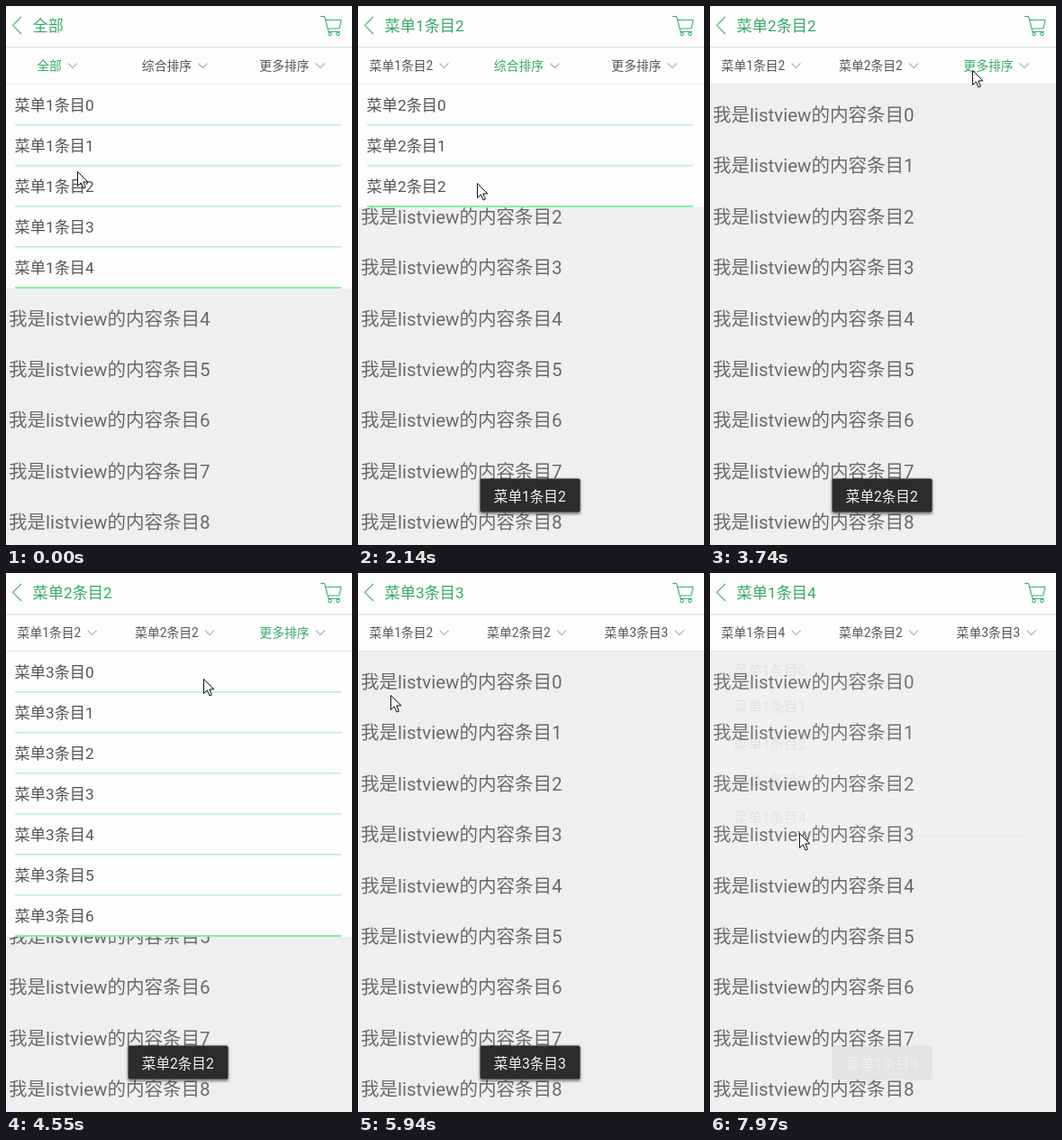
Animation, 384 px wide and 597 px high, one loop 8000 ms. Source, as an HTML page:

```html
<!DOCTYPE html>
<html lang="zh-CN">
<head>
<meta charset="utf-8">
<title>下拉菜单</title>
<style>
  html, body { margin: 0; width: 100%; height: 100%; overflow: hidden; background: #efefef; }
  svg { display: block; width: 384px; height: 597px; }
  text { font-family: Roboto, "Noto Sans CJK SC", "Noto Sans CJK", sans-serif; white-space: pre; }
  .line { fill: none; stroke: #3fb074; stroke-width: 1.1; stroke-linejoin: round; }
</style>
</head>
<body>
<svg id="stage" viewBox="0 0 384 597">
  <defs>
    <filter id="soft" x="-20%" y="-40%" width="140%" height="180%"><feGaussianBlur stdDeviation="1.8"/></filter>
  </defs>
  <rect width="384" height="597" fill="#efefef"/>
  <g id="list"></g>
  <g id="menus"></g>
  <g id="bar">
    <rect width="384" height="87" fill="#fdfdfd"/>
    <rect y="45" width="384" height="1.5" fill="#e1e4e2"/>
    <rect y="86" width="384" height="1" fill="#e6e6e6"/>
    <path class="line" d="M17 12L7.5 21.3L17 31"/>
    <path class="line" d="M349 11.5H353.5L358 28.5H371M354.5 15.5H372L370 25H357"/>
    <circle class="line" cx="359.5" cy="31" r="1.7"/>
    <circle class="line" cx="368.5" cy="31" r="1.7"/>
  </g>
  <g id="toasts"></g>
  <path id="cursor" d="M.5.5V16.5L4.3 12.9L7 19L9.4 18L6.8 11.9H11.8Z" fill="#fff" stroke="#111"/>
</svg>
<script>
const LOOP = 8000, STEP = 130, PHASE = 40;           // the screen refreshes in steps
const OPEN = 170, CLOSE = 128;                       // menu fades
const DELAY = 55, FADE = 450, STAY = 2045;           // toast timing after a pick
const REST = .3, EARLY = 270;                        // pointer pauses around clicks
const ROW = 45, TOP = 86;
const GREEN = '#35aa66', DARK = '#555';
const TABS = [
  { title: '全部', rows: 5 },
  { title: '综合排序', rows: 3 },
  { title: '更多排序', rows: 7 }
];

// Each visit: a click on a tab, then a click on one of its items
const VISITS = [
  { tab: 0, item: 2, open: -900, pick: 305, from: [43, 68], to: [79, 184] },
  { tab: 1, item: 2, open: 1660, pick: 2400, from: [165, 67], to: [132, 197] },
  { tab: 2, item: 3, open: 3680, pick: 5285, from: [291, 71], to: [26, 241] },
  { tab: 0, item: 4, open: 6370, pick: 7851, from: [43, 68], to: [99, 288] }
];
const CLICKS = VISITS.flatMap(v => [{ t: v.open, at: v.from }, { t: v.pick, at: v.to }]);

const $ = id => document.getElementById(id);
const clamp = v => Math.min(1, Math.max(0, v));
const ease = v => (1 - Math.cos(Math.PI * clamp(v))) / 2;
const label = (tab, item) => `菜单${tab + 1}条目${item}`;

function add(parent, tag, attrs = {}, content = '') {
  const el = document.createElementNS('http://www.w3.org/2000/svg', tag);
  for (const key in attrs) el.setAttribute(key, attrs[key]);
  el.textContent = content;
  return parent.appendChild(el);
}

function write(parent, x, y, size, fill, content = '') {
  return add(parent, 'text', { x, y, 'font-size': size, fill }, content);
}

for (let i = 0; i < 9; i++) {
  write($('list'), 3, 127.7 + i * 56.45, 20.5, '#6a6a6a', `我是listview的内容条目${i}`);
}

const menus = TABS.map(({ rows }, tab) => {
  const box = add($('menus'), 'g');
  add(box, 'rect', { y: TOP, width: 384, height: rows * ROW + 2, fill: '#fdfdfd' });
  const body = add(box, 'g');
  for (let i = 0; i < rows; i++) {
    const last = i === rows - 1, y = TOP + i * ROW;
    write(body, 9.6, y + 30.4, 17.2, DARK, label(tab, i));
    add(body, 'rect', {
      x: 10, y: y + ROW, width: 362, height: last ? 2 : 1.5, fill: last ? '#8cee9c' : '#b5f2cb'
    });
  }
  return { box, body };
});

const header = write($('bar'), 29.6, 27.8, 17.2, GREEN);
const tabs = TABS.map(() => ({
  text: write($('bar'), 0, 71.1, 13.8, DARK),
  arrow: add($('bar'), 'path', {
    d: 'M0 63.5L5 68.5L10 63.5', fill: 'none', stroke: '#b8b8b8', 'stroke-width': 1.3
  })
}));

const toasts = VISITS.map(v => {
  const g = add($('toasts'), 'g');
  add(g, 'rect', {
    x: 135, y: 524, width: 112, height: 39, rx: 2, opacity: .45, filter: 'url(#soft)'
  });
  add(g, 'rect', { x: 135.5, y: 523.5, width: 111, height: 37, rx: 2, fill: '#2c2c2c' });
  write(g, 150.8, 548.8, 15.6, '#f2f2f2', label(v.tab, v.item));
  return g;
});

function drawMenus(t) {
  menus.forEach(({ box, body }, tab) => {
    const v = VISITS.find(v => v.tab === tab && t >= v.open && t < v.pick + CLOSE);
    const a = v ? clamp((t - v.open) / OPEN) - clamp((t - v.pick) / CLOSE) : 0;
    box.setAttribute('opacity', a);
    body.setAttribute('transform', `translate(192 ${TOP}) scale(${.9 + .1 * a}) translate(-192 ${-TOP})`);
  });
}

function drawBar(t) {
  const names = TABS.map(tab => tab.title);
  let title = names[0], active = -1;
  for (const v of VISITS) {
    if (t >= v.pick) title = names[v.tab] = label(v.tab, v.item);
    else if (t >= v.open) active = v.tab;
  }
  header.textContent = title;
  tabs.forEach(({ text, arrow }, i) => {
    text.textContent = names[i];
    text.setAttribute('fill', i === active ? GREEN : DARK);
    const w = text.getComputedTextLength();
    const x = 56.7 + i * 130.5 - (w + 17.5) / 2;
    text.setAttribute('x', x);
    arrow.setAttribute('transform', `translate(${x + w + 7.3} 0)`);
  });
}

function drawToasts(t) {
  VISITS.forEach((v, i) => {
    const age = t - v.pick - DELAY;
    toasts[i].setAttribute('opacity', ease(age / FADE) - ease((age - STAY) / FADE));
  });
}

// Rest after a click, then glide and arrive shortly before the next one
function drawCursor(t) {
  const i = CLICKS.findLastIndex(c => c.t <= t);
  const a = CLICKS[i], b = CLICKS[i + 1] || a;
  const leave = a.t + (b.t - a.t) * REST, arrive = b.t - EARLY;
  const k = a === b ? 0 : ease((t - leave) / (arrive - leave));
  const [x, y] = a.at.map((p, axis) => Math.round(p + (b.at[axis] - p) * k));
  $('cursor').setAttribute('transform', `translate(${x} ${y})`);
}

function frame() {
  const now = performance.now() % LOOP;
  const t = Math.max(0, Math.floor((now - PHASE) / STEP) * STEP + PHASE);
  drawMenus(t);
  drawBar(t);
  drawToasts(t);
  drawCursor(t);
  requestAnimationFrame(frame);
}
frame();
</script>
</body>
</html>
```
